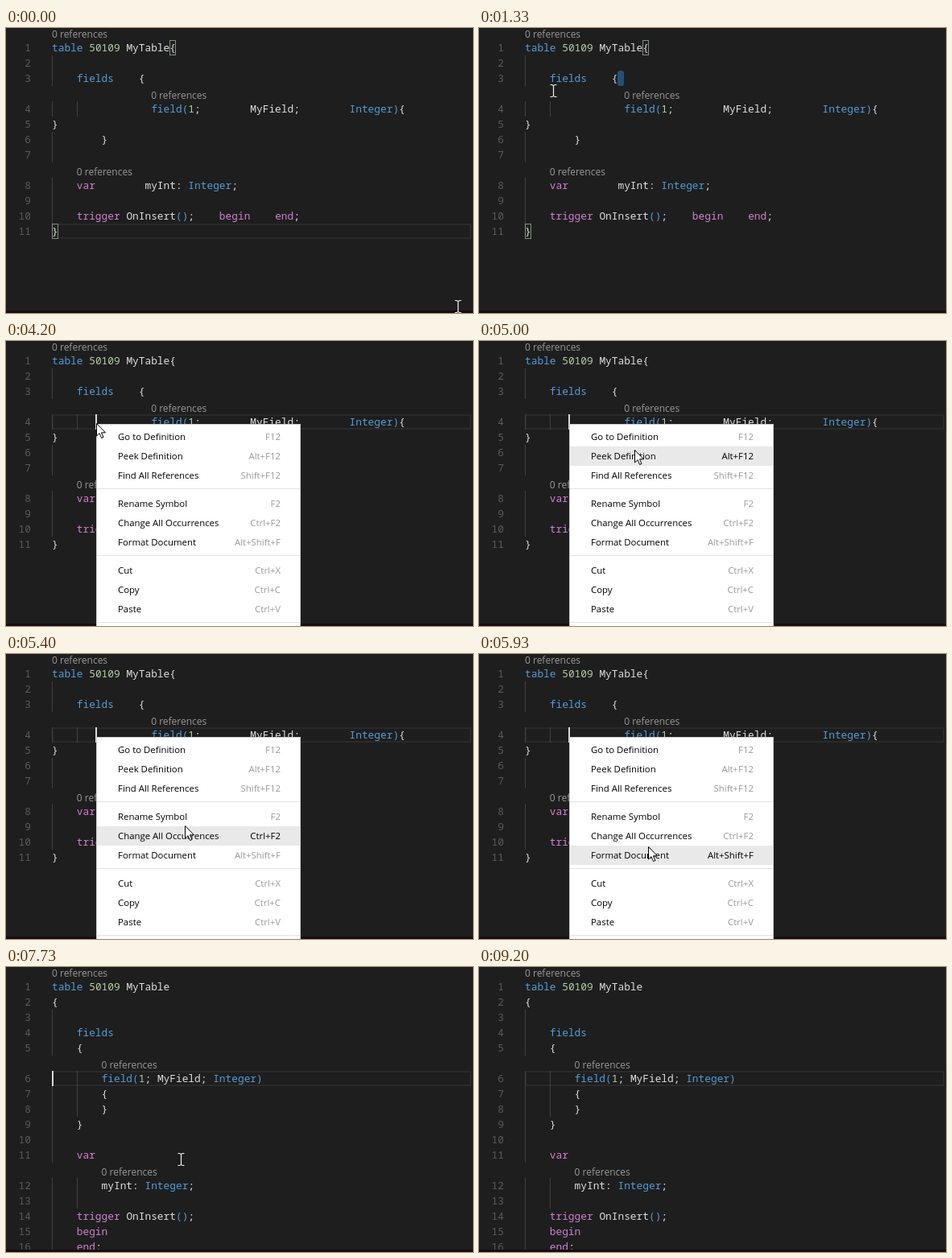
Animation, 580 px wide and 354 px high, one loop 9.54 s. Source, as an HTML page:

```html
<!DOCTYPE html>
<html lang="en">
<head>
<meta charset="utf-8">
<title>Code formatting</title>
<style>
  html, body { margin: 0; width: 100%; height: 100%; overflow: hidden; background: #1e1e1e; }
  svg { display: block; }
  text { white-space: pre; }
  .code { font: 12.83px "Noto Sans Mono", "DejaVu Sans Mono", monospace; fill: #dedede; }
  .blue { fill: #569cd6; }
  .pink { fill: #d081cf; }
  .num { fill: #b5cea8; }
  .line { fill: #5a5a5a; text-anchor: end; }
  .lens { font: 12px "Open Sans", "Noto Sans", sans-serif; fill: #999; }
  .item { font: 11.4px "Open Sans", "Noto Sans", sans-serif; fill: #000; }
  .key { fill: #9a9a9a; text-anchor: end; }
  .hot .key { fill: #000; }
  .back { fill: none; }
  .hot .back { fill: #e9e9e9; }
</style>
</head>
<body>
<svg id="stage" width="580" height="354" viewBox="0 0 580 354"></svg>
<script>
const LOOP = 9540, STEP = 200 / 3, CH = 7.698, LEFT = 57;
const stage = document.getElementById('stage');

function add(parent, tag, attrs = {}, text) {
  const node = document.createElementNS('http://www.w3.org/2000/svg', tag);
  for (const k in attrs) node.setAttribute(k, attrs[k]);
  if (text !== undefined) node.textContent = text;
  parent.appendChild(node);
  return node;
}
const rect = (parent, x, y, width, height, fill, more) =>
  add(parent, 'rect', { x, y, width, height, fill, ...more });
const show = (node, on) => node.setAttribute('visibility', on ? 'visible' : 'hidden');
const rowY = r => 15 + 19 * r;
const colX = c => LEFT + CH * c;

const TOKEN = /(\b(?:table|fields?|Integer)\b|[()]+)|(\b(?:var|trigger|begin|end)\b)|(\d+)|[^()\d\s]+?(?=\W|$)|\s+|./g;

function codeLine(parent, row, source) {
  const indent = source.search(/\S/);
  const text = add(parent, 'text', { class: 'code', x: colX(indent), y: rowY(row) + 14 });
  for (const [part, blue, pink, num] of source.slice(indent).matchAll(TOKEN)) {
    add(text, 'tspan', { class: blue ? 'blue' : pink ? 'pink' : num ? 'num' : '' }, part);
  }
}

// A line "@n" is a reference note at column n and has no line number.
function listing(lines, guides) {
  const g = add(stage, 'g');
  for (const [col, from, to] of guides) {
    rect(g, Math.round(colX(col)), rowY(from), 1, 19 * (to - from), '#404040');
  }
  let n = 0;
  lines.forEach((src, row) => {
    row -= 1;
    if (src[0] === '@') {
      add(g, 'text', { class: 'lens', x: colX(+src.slice(1)), y: rowY(row) + 16 }, '0 references');
      return;
    }
    add(g, 'text', { class: 'code line', x: 31, y: rowY(row) + 14 }, ++n);
    if (src) codeLine(g, row, src);
  });
  return g;
}

const highlight = add(stage, 'rect',
  { x: 58, width: 519, height: 17, fill: 'none', stroke: '#2a2a2a', 'stroke-width': 2 });
const selection = rect(stage, 172, 53, 8, 19, '#264f78', { rx: 3 });
const brackets = add(stage, 'g');
for (const [x, y] of [[203.5, 15.5], [57.5, 243.5]]) {
  rect(brackets, x, y, 7, 18, '#1c251c', { stroke: '#888' });
}

const sp = n => ' '.repeat(n);
const messy = listing([
  '@0',
  'table 50109 MyTable{',
  '',
  sp(4) + 'fields' + sp(4) + '{',
  '@16',
  sp(16) + 'field(1;' + sp(8) + 'MyField;' + sp(8) + 'Integer){',
  '}',
  sp(8) + '}',
  '',
  '@4',
  sp(4) + 'var' + sp(8) + 'myInt: Integer;',
  '',
  sp(4) + 'trigger OnInsert();' + sp(4) + 'begin' + sp(4) + 'end;',
  '}'
], [[0, 1, 3], [0, 4, 5], [4, 4, 5], [0, 6, 8], [0, 9, 12]]);

const tidy = listing([
  '@0',
  'table 50109 MyTable',
  '{',
  '',
  sp(4) + 'fields',
  sp(4) + '{',
  '@8',
  sp(8) + 'field(1; MyField; Integer)',
  sp(8) + '{',
  sp(8) + '}',
  sp(4) + '}',
  '',
  sp(4) + 'var',
  '@8',
  sp(8) + 'myInt: Integer;',
  '',
  sp(4) + 'trigger OnInsert();',
  sp(4) + 'begin',
  sp(4) + 'end;'
], [[0, 2, 5], [0, 6, 12], [4, 6, 9], [0, 13, 18], [4, 13, 15]]);

const caret = rect(stage, 0, 0, 2, 19, '#d8d8d8');
rect(stage, 0, 351, 580, 3, '#180e12');

const menu = add(stage, 'g');
rect(menu, 112.5, 103.5, 253, 260, '#fff', { stroke: '#ccc' });
const items = [];
[
  [['Go to Definition', 'F12'], ['Peek Definition', 'Alt+F12'], ['Find All References', 'Shift+F12']],
  [['Rename Symbol', 'F2'], ['Change All Occurrences', 'Ctrl+F2'], ['Format Document', 'Alt+Shift+F']],
  [['Cut', 'Ctrl+X'], ['Copy', 'Ctrl+C'], ['Paste', 'Ctrl+V']]
].forEach((group, i) => {
  group.forEach(([name, key], j) => {
    const y = 107 + 83 * i + 24 * j, g = add(menu, 'g');
    add(g, 'rect', { class: 'back', x: 113, y, width: 252, height: 24 });
    add(g, 'text', { class: 'item', x: 139, y: y + 16 }, name);
    add(g, 'text', { class: 'item key', x: 341, y: y + 16 }, key);
    items.push({ g, y });
  });
  rect(menu, 113, 183 + 83 * i, 252, 1, '#e2e2e2');
});

const beam = add(stage, 'path', {
  d: 'M-3.5 -7.5H-1.5L.5 -6.5L2.5 -7.5H4.5M.5 -6.5V6.5M-3.5 7.5H-1.5L.5 6.5L2.5 7.5H4.5',
  fill: 'none', stroke: '#f0f0f0', 'stroke-width': 1.2
});
const arrow = add(stage, 'path', {
  d: 'M.5 .5V16L4 12.7L6.6 18.5L9 17.5L6.5 11.8H11.5Z', fill: '#fff', stroke: '#000'
});

// Pointer stops: time, x, y, and 1 where the move into the stop is eased.
const stops = [
  [0, 561, 346], [1000, 92, 83, 1], [1067, 92, 83], [1133, 92, 78],
  [2267, 92, 78], [2667, 105, 86, 1], [3400, 105, 86], [3800, 112, 102, 1],
  [4333, 112, 102], [4467, 123, 102], [4800, 123, 102], [5000, 193, 135],
  [5400, 222, 213], [5733, 212, 242], [5867, 212, 242], [5933, 210, 239],
  [6533, 210, 239], [6600, 212, 243], [6800, 212, 243], [7000, 217, 239],
  [8533, 217, 239], [9000, 205, 372, 1], [LOOP, 205, 372]
];

function pointer(t) {
  const i = Math.max(1, stops.findIndex(s => s[0] >= t));
  const [t0, x0, y0] = stops[i - 1], [t1, x1, y1, eased] = stops[i];
  let u = (t - t0) / (t1 - t0);
  if (eased) u = u * u * (3 - 2 * u);
  return [Math.round(x0 + (x1 - x0) * u), Math.round(y0 + (y1 - y0) * u)];
}

const between = (t, a, b) => t >= a && t < b;
const blink = (t, start) => Math.floor((t - start) / 500) % 2 === 0;

function draw(now) {
  const t = Math.floor((now % LOOP + 4) / STEP) * STEP + 1;
  const [mx, my] = pointer(Math.min(t - 1, LOOP));
  const formatted = t >= 6730, placed = t >= 4130;

  show(messy, !formatted);
  show(tidy, formatted);
  show(brackets, t < 1400);
  show(selection, between(t, 1330, 4130));
  show(highlight, t < 1330 || placed);
  highlight.setAttribute('y', rowY(formatted ? 6 : placed ? 4 : 12) + 1);

  caret.setAttribute('x', placed && !formatted ? 111 : LEFT);
  caret.setAttribute('y', rowY(formatted ? 6 : 4));
  show(caret, formatted ? blink(t, 6700) : placed || (t >= 1330 && blink(t, 1360)));

  const open = between(t, 4200, 6530), pointing = between(t, 4200, 6600);
  show(menu, open);
  for (const { g, y } of items) {
    g.setAttribute('class', open && mx > 113 && my + 1 >= y && my + 1 < y + 24 ? 'hot' : '');
  }
  show(arrow, pointing);
  show(beam, !pointing);
  (pointing ? arrow : beam).setAttribute('transform', `translate(${mx} ${my})`);
}

const begun = performance.now();
function tick() {
  draw(performance.now() - begun);
  requestAnimationFrame(tick);
}
tick();
</script>
</body>
</html>
```
